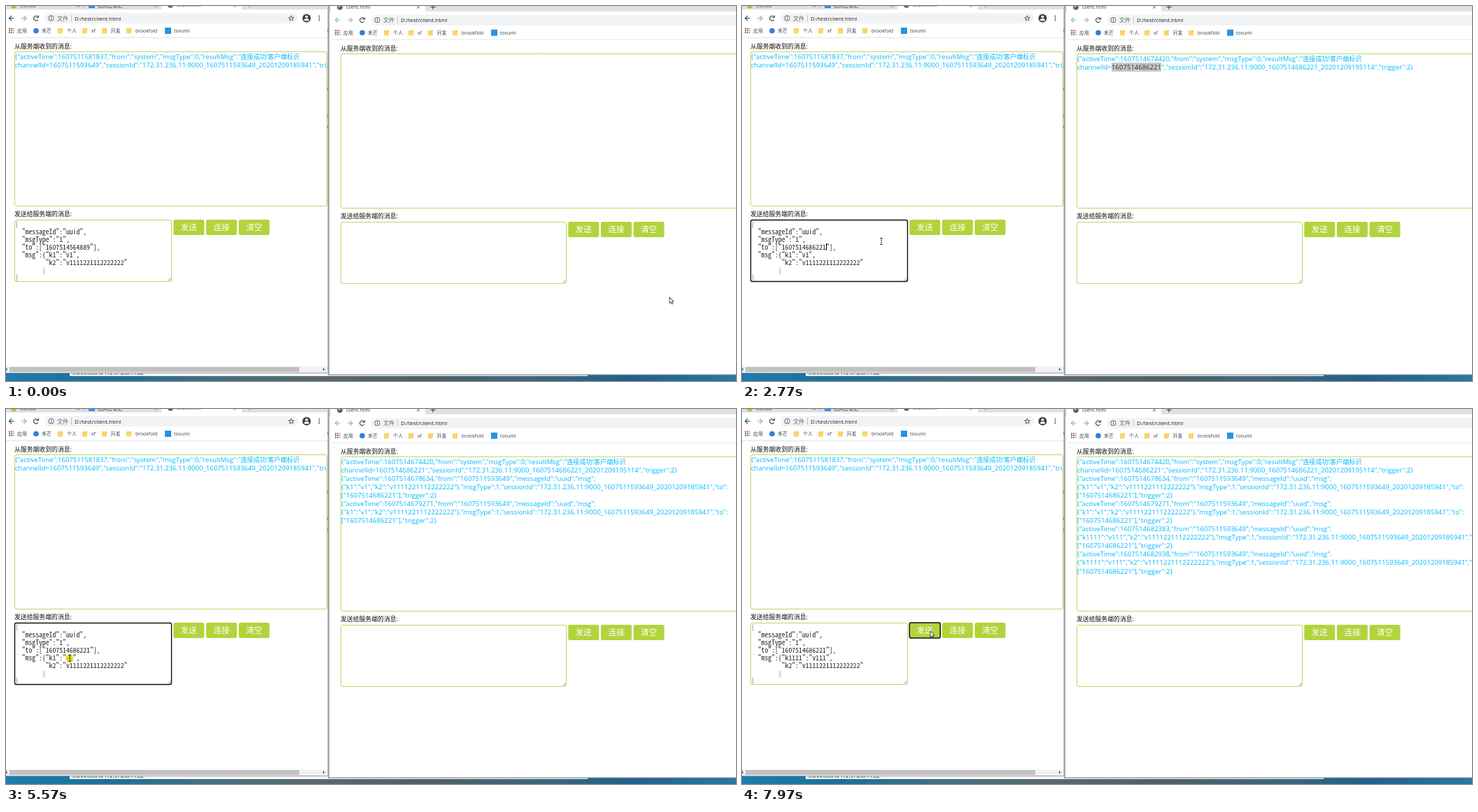
An HTML page with a canvas for the animation above (8000 ms loop, 1043x537 px).

```html
<!DOCTYPE html>
<html lang="zh-CN">
<head>
<meta charset="utf-8">
<title>Message push demo</title>
<style>
html, body { margin: 0; width: 100%; height: 100%; overflow: hidden; background: #fff; }
canvas { display: block; width: 100vw; height: 100vh; }
</style>
</head>
<body>
<canvas id="stage" width="1043" height="537"></canvas>
<script>
const W = 1043, H = 537, LOOP = 8000;
const ctx = document.getElementById('stage').getContext('2d');
const SANS = '"Open Sans", "Noto Sans", "Noto Sans CJK SC", sans-serif';
const MONO = '"Noto Sans Mono CJK SC", "Liberation Mono", monospace';
const GREEN = '#b3d33c', BORDER = '#bdd765', BLUE = '#00b9ff', DARK = '#3c4043';
const COL = 4.86, ROW = 10.95, LOG_SIZE = 9.57, LOG_ROW = 12.04;

// Editor type size that gives one column per character
ctx.font = `100px ${MONO}`;
const MONO_SIZE = COL * 100 / ctx.measureText('0').width;

const OLD_ID = '1607514564889', NEW_ID = '1607514686221';
const LEFT_ID = '1607511593649';
const SESSION = '"sessionId":"172.31.236.11:9000_';

function rect(x, y, w, h, color) {
  ctx.fillStyle = color;
  ctx.fillRect(x, y, w, h);
}
function rounded(x, y, w, h, r, fill, stroke, width = 1) {
  ctx.beginPath();
  ctx.roundRect(x, y, w, h, r);
  if (fill) { ctx.fillStyle = fill; ctx.fill(); }
  if (stroke) { ctx.strokeStyle = stroke; ctx.lineWidth = width; ctx.stroke(); }
}
function dot(x, y, r, color) {
  ctx.beginPath();
  ctx.arc(x, y, r, 0, 7);
  ctx.fillStyle = color;
  ctx.fill();
}
function line(points, color, width = 1) {
  ctx.beginPath();
  points.forEach(([x, y], i) => i ? ctx.lineTo(x, y) : ctx.moveTo(x, y));
  ctx.strokeStyle = color;
  ctx.lineWidth = width;
  ctx.stroke();
}
function clipped(x, y, w, h, paint) {
  ctx.save();
  ctx.beginPath();
  ctx.rect(x, y, w, h);
  ctx.clip();
  paint();
  ctx.restore();
}
function text(str, x, y, size, color, family = SANS) {
  ctx.font = `${size}px ${family}`;
  ctx.fillStyle = color;
  ctx.fillText(str, x, y);
  return x + ctx.measureText(str).width;
}
// Chinese runs are set slightly smaller than the Latin ones
function message(str, x, y) {
  for (const part of str.split(/([\u4e00-\u9fff]+)/))
    x = text(part, x, y, /[\u4e00-\u9fff]/.test(part) ? 9.05 : LOG_SIZE, BLUE);
}

function welcome(time, id, stamp) {
  return [
    `{"activeTime":${time},"from":"system","msgType":0,"resultMsg":"连接成功!客户端标识`,
    `channelId=${id}",${SESSION}${id}_${stamp}","trigger":2}`
  ];
}
function pushed(time, k, v) {
  return [
    `{"activeTime":${time},"from":"${LEFT_ID}","messageId":"uuid","msg":`,
    `{"${k}":"${v}","k2":"v1111221112222222"},"msgType":1,${SESSION}${LEFT_ID}_20201209185941","to":`,
    `["${NEW_ID}"],"trigger":2}`
  ];
}
const LEFT_LOG = welcome('1607511581837', LEFT_ID, '20201209185941');
const RIGHT_LOG = [
  [820, welcome('1607514674420', NEW_ID, '20201209195114')],
  [3630, pushed('1607514678634', 'k1', 'v1')],
  [4240, pushed('1607514679271', 'k1', 'v1')],
  [7360, pushed('1607514682383', 'k1111', 'v111')],
  [7890, pushed('1607514682938', 'k1111', 'v111')]
];

// Pointer path: time, x, y
const PATH = [
  [0, 948, 417], [69, 948, 417], [70, 888, 319], [209, 888, 319], [290, 880, 303],
  [360, 874, 312], [440, 871, 318], [740, 871, 318], [860, 850, 320], [1140, 650, 320],
  [1370, 625, 255], [1600, 602, 89], [1900, 530, 89], [1980, 525, 95], [2220, 134, 318],
  [2310, 121, 346], [2500, 57, 346], [2620, 62, 345], [2770, 199, 337], [3080, 225, 338],
  [3320, 280, 317], [4480, 280, 317], [4880, 106, 362], [5030, 105, 362], [5190, 91, 362],
  [5340, 91, 359], [5420, 91, 357], [6200, 91, 357], [6350, 67, 356], [6740, 67, 356],
  [7050, 257, 321], [7130, 269, 318], [8000, 269, 318]
];
const PRESSES = [[590, 670], [1600, 1900], [2310, 2500], [3550, 3630], [5570, 5650],
  [6350, 6430], [7280, 7360], [7820, 7890]];
// Caret: time, row, column
const EDITS = [[2310, 3, 22], [2690, 3, 22], [5570, 4, 16], [5880, 4, 17], [6040, 4, 18],
  [6350, 4, 11], [6580, 4, 12], [6660, 4, 13], [6740, 4, 14]];

const within = (t, a, b) => t >= a && t < b;
const count = (t, times) => times.filter(s => t >= s).length;

function pointerAt(t) {
  const i = PATH.findIndex(p => p[0] > t);
  const [t0, x0, y0] = PATH[i - 1], [t1, x1, y1] = PATH[i];
  const u = (t - t0) / (t1 - t0);
  return [x0 + (x1 - x0) * u, y0 + (y1 - y0) * u];
}
function overField(x, y) {
  const hit = (l, r, top, bottom) => x > l && x < r && y > top && y < bottom;
  return hit(12, 459, 66, 286) || hit(12, 237, 306, 395) ||
    hit(478, W, 68, 289) || hit(478, 801, 309, 398);
}

function desktop() {
  const sea = ctx.createLinearGradient(0, 0, W, 0);
  ['#1f7cab', '#1b6f9b', '#44707f', '#59686d', '#4f5f66', '#41667a', '#1f628c', '#2b789f']
    .forEach((c, i) => sea.addColorStop(i / 7, c));
  rect(0, 500, W, 37, sea);
  rect(91, 520, 740, 10, '#f4f4f4');
  text('Connected to 172.31.236.11:22.', 95, 527.5, 7, '#222');
}

function arrowIcon(x, y, dir, color) {
  line([[x - 3.5 * dir, y], [x + 3.5 * dir, y]], color, 1.1);
  line([[x, y - 3.5], [x + 3.5 * dir, y], [x, y + 3.5]], color, 1.1);
}
function cross(x, y, r = 2) {
  line([[x - r, y - r], [x + r, y + r]], '#5f6368');
  line([[x - r, y + r], [x + r, y - r]], '#5f6368');
}
function plus(x, y) {
  line([[x - 3.5, y], [x + 3.5, y]], DARK);
  line([[x, y - 3.5], [x, y + 3.5]], DARK);
}

// Toolbar and bookmarks, placed by the window's corner
function chrome(dx, dy, right, barWidth, backColor) {
  const y = dy + 17.5;
  rect(dx, dy + 5, right - dx, 40, '#fff');
  arrowIcon(dx + 8, y, -1, backColor);
  arrowIcon(dx + 25.5, y, 1, '#a5a8ac');
  ctx.beginPath();
  ctx.arc(dx + 43, y, 3.3, 0.6, 5.6);
  ctx.strokeStyle = DARK;
  ctx.lineWidth = 1.1;
  ctx.stroke();
  line([[dx + 46.5, y - 4], [dx + 46.5, y - 1], [dx + 43.5, y - 1]], DARK, 1.1);
  rounded(dx + 55, y - 7.5, barWidth, 15, 7.5, '#f1f3f4');
  dot(dx + 64.5, y, 3.9, '#5f6368');
  dot(dx + 64.5, y, 3, '#f1f3f4');
  rect(dx + 64, y - 2, 1, 1, '#5f6368');
  rect(dx + 64, y - 0.4, 1, 2.3, '#5f6368');
  text('文件', dx + 73, y + 3, 8, '#5f6368');
  rect(dx + 93, y - 4.5, 0.8, 9, '#b5b8bc');
  text('D:/test/client.html', dx + 98, y + 3, 7.9, '#202124');

  const by = dy + 35.5;
  const tints = ['#e04a3f', '#e04a3f', '#e8a33c', '#4a9a54', '#4285e4', '#e8a33c', '#4a9a54', '#4285e4', '#e8a33c'];
  tints.forEach((c, i) => rect(dx + 4 + i % 3 * 2.8, by - 4 + (i / 3 | 0) * 2.8, 2, 2, c));
  dot(dx + 43, by, 3.8, '#2f7de0');
  [74, 109, 137, 172].forEach(x => {
    rounded(dx + x, by - 3.5, 7, 7.5, 0.8, '#fbd665');
    rect(dx + x + 5, by - 3.5, 2, 2, '#f0c04a');
  });
  rect(dx + 227, by - 4.5, 9, 9, '#2a93dc');
  [['应用', 16], ['禾芒', 51], ['个人', 87], ['xf', 122], ['开发', 149.5], ['brookfold', 185], ['tovumi', 240]]
    .forEach(([name, x]) => text(name, dx + x, by + 2.6, 6.9, DARK));
  rect(dx, dy + 45, right - dx, 1, '#e1e3e6');
}

function button(x, y, label, focused) {
  rounded(x, y, 44, 22, 2.5, GREEN);
  text(label, x + 10.5, y + 15.3, 11.5, '#fff');
  if (focused) rounded(x, y, 44, 22, 2.5, null, '#101010', 1.5);
}
function field(x, y, w, h, focused) {
  rounded(x + 0.5, y + 0.5, w - 1, h - 1, 2.5, '#fff', focused ? '#101010' : BORDER, focused ? 1.4 : 1);
}
function grip(x, y) {
  line([[x - 6, y - 1.5], [x - 1.5, y - 6]], '#888', 0.8);
  line([[x - 3.5, y - 1.5], [x - 1.5, y - 3.5]], '#888', 0.8);
}
function page(dx, dy, logW, inputW, focus) {
  text('从服务端收到的消息:', dx + 12, dy + 60.8, 8.85, '#111');
  field(dx + 12, dy + 65, logW, 222);
  text('发送给服务端的消息:', dx + 12, dy + 301.3, 8.85, '#111');
  field(dx + 12, dy + 306, inputW, 89, focus === 'input');
  grip(dx + 12 + inputW, dy + 395);
  ['发送', '连接', '清空'].forEach((label, i) =>
    button(dx + inputW + 14.3 + i * 46.6, dy + 306, label, focus === label));
}

function editor(t, focused) {
  const ones = n => '1'.repeat(n);
  const k = ones(1 + count(t, [6580, 6660, 6740]));
  const v = ones(1 + count(t, [5880, 6040]));
  const id = t < 2690 ? OLD_ID : NEW_ID;
  const rows = ['{', '  "messageId":"uuid",', '  "msgType":"1",', `  "to":["${id}"],`,
    `  "msg":{"k${k}":"v${v}",`, '         "k2":"v1111221112222222"', '        }', '}'];
  const colX = c => 13 + c * COL, base = r => 315.8 + r * ROW;
  const write = (i, color) => text(rows[i], 13, base(i), MONO_SIZE, color, MONO);
  rows.forEach((row, i) => write(i, /^ *[{}]$/.test(row) ? '#888' : '#222'));
  if (within(t, 2310, 2690)) {
    const from = colX(22 - 13 * Math.min(1, (t - 2310) / 190));
    clipped(from, base(3) - 9, colX(22) - from, ROW, () => {
      rect(13, base(3) - 9, 220, ROW, '#3390ff');
      write(3, '#fff');
    });
  } else if (focused) {
    const edit = EDITS.filter(e => t >= e[0]).pop();
    if (edit && (t - edit[0]) % 1060 < 530)
      rect(Math.round(colX(edit[2])), base(edit[1]) - 8.5, 1, 10, '#000');
  }
}

function leftWindow(t) {
  const focus = within(t, 2310, 3550) || within(t, 5570, 7280) ? 'input' : t >= 3550 ? '发送' : '';
  rect(0, 0, 460, 525, '#fff');
  rect(0, 0, 460, 5, '#dee1e6');
  rounded(222, -10, 115, 18, 4, '#fff');
  chrome(0, 0, 460, 362, DARK);
  dot(11, -0.5, 4, '#a9c32f');
  text('eureka', 20, 2, 7, DARK);
  rect(118, -5, 9, 8, '#2f8cf0');
  text('松风云笔记', 131, 2.3, 7, DARK);
  dot(235, -1, 3.8, '#5f6368');
  text('client.html', 244, 1.3, 7, DARK);
  [103, 215, 327].forEach(x => cross(x, -0.5));
  plus(348, -2);
  rect(110, 0, 0.8, 3, '#9a9da2');

  const star = [];
  for (let i = 0; i <= 10; i++) {
    const a = i * Math.PI / 5 - Math.PI / 2, r = i % 2 ? 1.7 : 4;
    star.push([407.5 + r * Math.cos(a), 17.7 + r * Math.sin(a)]);
  }
  line(star, DARK, 0.9);
  dot(429.5, 17.5, 6, DARK);
  dot(429.5, 15.5, 1.9, '#fff');
  rounded(426, 18.3, 7, 3, 1.5, '#fff');
  [-3, 0, 3].forEach(d => dot(447.5, 17.5 + d, 0.9, DARK));

  page(0, 0, 447, 225, focus);
  clipped(13, 66, 445, 220, () =>
    LEFT_LOG.forEach((row, i) => message(row, 12.8, 76 + i * LOG_ROW)));
  editor(t, focus === 'input');

  rect(0, 516, 460, 9, '#f1f1f1');
  rect(5, 517, 414, 7, '#c1c1c1');
  const tip = (x, d) => {
    ctx.beginPath();
    ctx.moveTo(x, 518);
    ctx.lineTo(x + 2.5 * d, 520.3);
    ctx.lineTo(x, 522.6);
    ctx.fillStyle = '#505050';
    ctx.fill();
  };
  tip(1.5, -1);
  tip(453, 1);
  rect(0, 525, 460, 1, '#9aa0a4');
}

function rightWindow(t) {
  rect(459, 0, 3, 526, '#c9ccd0');
  rect(460.5, 0, 1.2, 528, '#85888c');
  [33, 117, 155, 171].forEach(y => rect(459, y, 1.5, 4, '#8a8d91'));
  rect(462, 0, W - 462, 528, '#fff');
  rect(462, 0, W - 462, 10, '#dee1e6');
  rounded(464, -8, 135, 24, 4, '#fff');
  chrome(466, 2.7, W, 640, '#a5a8ac');
  rect(462, 12, 4, 33, '#fff');
  dot(477, 1.5, 3.9, '#5f6368');
  dot(476, 0.5, 1.3, '#cfd2d6');
  text('client.html', 486, 4, 7, DARK);
  cross(589, 1.5);
  plus(610, 1.5);

  page(466, 3, 640, 323, within(t, 590, 1600) ? '连接' : '');
  let y = 79;
  for (const [start, rows] of RIGHT_LOG) {
    for (const row of rows) {
      if (t >= start) message(row, 478.8, y);
      y += LOG_ROW;
    }
  }
  if (within(t, 1600, 3550)) selection(t);
  rect(460, 527.5, W - 460, 1.2, '#7d878e');
}

// The channel id, marked from its end towards its start
function selection(t) {
  ctx.font = `${LOG_SIZE}px ${SANS}`;
  const start = 478.8 + ctx.measureText('channelId=').width;
  const width = ctx.measureText(NEW_ID).width;
  const w = width * Math.min(1, (t - 1600) / 300), active = t < 2310;
  clipped(start + width - w, 81, w, 13, () => {
    rect(start, 81, width, 13, active ? '#3390ff' : '#c8c8c8');
    text(NEW_ID, start, 79 + LOG_ROW, LOG_SIZE, active ? '#fff' : '#323232');
  });
}

function pointer(t) {
  const [x, y] = pointerAt(t);
  if (PRESSES.some(([a, b]) => within(t, a, b))) dot(x, y, 6, 'rgba(240, 230, 0, 0.7)');
  if (overField(x, y)) {
    line([[x, y - 4.5], [x, y + 4.5]], '#333', 0.9);
    line([[x - 2, y - 4.5], [x + 2, y - 4.5]], '#333', 0.9);
    line([[x - 2, y + 4.5], [x + 2, y + 4.5]], '#333', 0.9);
    return;
  }
  const shape = [[0, 0], [0, 8.6], [2, 6.9], [3.4, 10], [4.7, 9.4], [3.4, 6.4], [6, 6.2]];
  ctx.beginPath();
  shape.forEach(([px, py]) => ctx.lineTo(x + px, y + py));
  ctx.closePath();
  ctx.fillStyle = '#fff';
  ctx.fill();
  ctx.strokeStyle = '#111';
  ctx.lineWidth = 0.8;
  ctx.stroke();
}

function draw(t) {
  ctx.clearRect(0, 0, W, H);
  desktop();
  leftWindow(t);
  rightWindow(t);
  pointer(t);
}

const begin = performance.now();
function tick() {
  draw((performance.now() - begin) % LOOP);
  requestAnimationFrame(tick);
}
tick();
</script>
</body>
</html>
```
